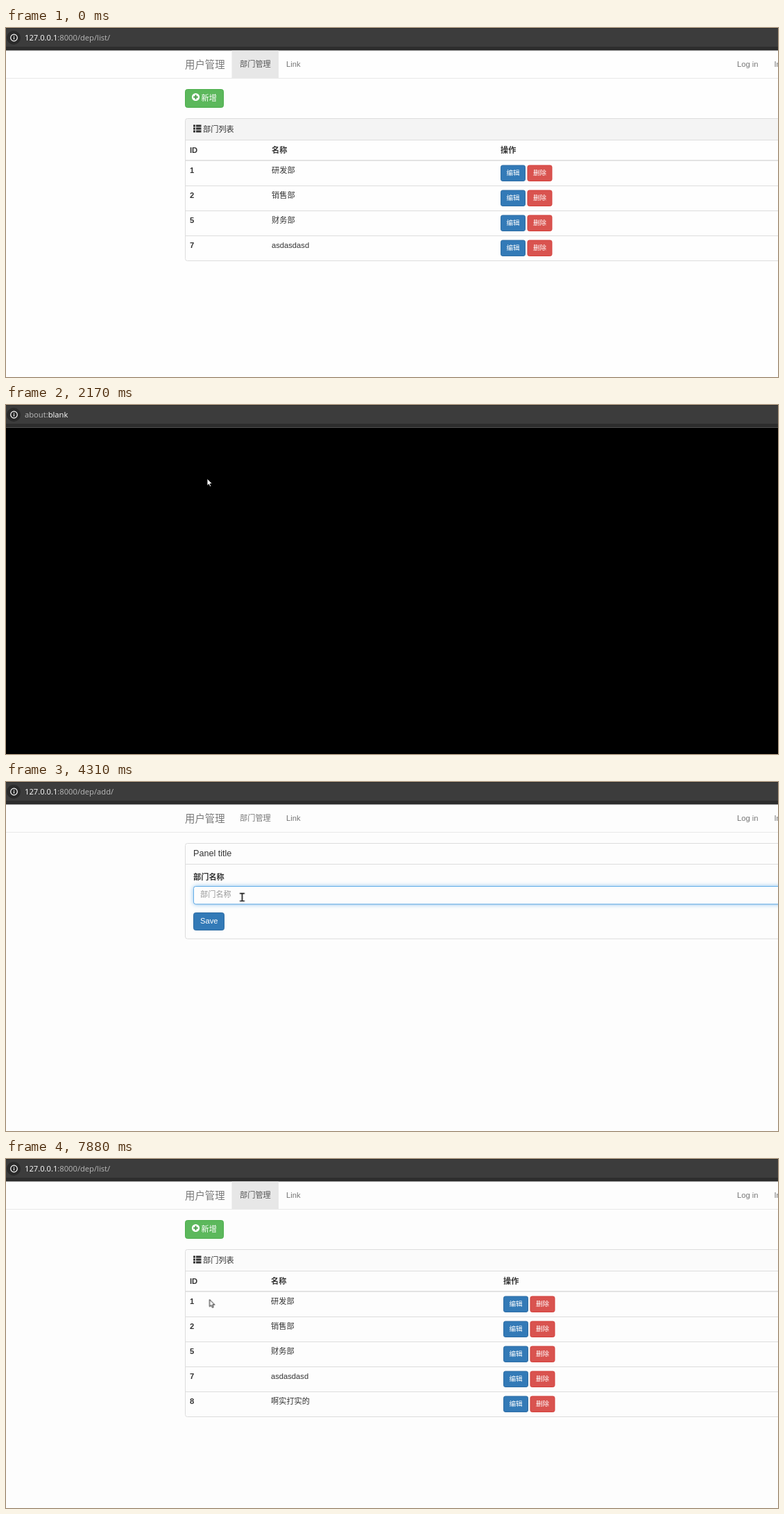
An HTML page for the animation above (8000 ms loop, 1113 by 503 pixels).

```html
<!DOCTYPE html>
<html lang="zh-CN">
<head>
<meta charset="utf-8">
<title>部门管理</title>
<style>
html, body { margin: 0; width: 100%; height: 100%; overflow: hidden; background: #fdfdfd; }
svg { display: block; width: 1113px; height: 503px; }
text { font: 11.2px "Liberation Sans", "Noto Sans CJK SC", "Noto Sans CJK", sans-serif; fill: #333; white-space: pre; }
.url { font: 11.2px "Open Sans", "Noto Sans", sans-serif; fill: #b9b9b9; }
.hi { fill: #fff; }
.nav { fill: #777; }
.on { fill: #555; }
.brand { font-size: 14.4px; fill: #777; }
.b { font-weight: 700; }
.btn { fill: #fff; font-weight: 500; }
.small { fill: #fff; font-size: 9.6px; font-weight: 500; }
.title { font-size: 12.6px; }
.hint { fill: #999; }
.field { fill: #555; }
.cand { fill: #e4e4e4; font-size: 13px; }
#glow { filter: drop-shadow(0 0 3px rgba(102, 175, 233, .75)); }
</style>
</head>
<body>
<svg id="stage" viewBox="0 0 1113 503"></svg>
<script>
const LOOP = 8000;
const pct = ms => ms / LOOP * 100 + '%';
let css = '';

// Visible only within the given [from, to] spans, in ms
function show(id, ...spans) {
  const steps = spans.map(([a, b]) =>
    `${pct(a)}{visibility:visible}${pct(b)}{visibility:hidden}`).join('');
  css += `@keyframes ${id}{0%{visibility:hidden}${steps}}
    #${id}{animation:${id} ${LOOP}ms step-end infinite}`;
}

// Interpolated styles; each stop is [ms, declarations]
function move(id, stops) {
  css += `@keyframes ${id}{${stops.map(([ms, s]) => `${pct(ms)}{${s}}`).join('')}}
    #${id}{animation:${id} ${LOOP}ms linear infinite}`;
}

const box = (x, y, w, h, fill, stroke = 'none', r = 0, extra = '') =>
  `<rect x="${x}" y="${y}" width="${w}" height="${h}" rx="${r}" fill="${fill}" stroke="${stroke}" ${extra}/>`;
const txt = (x, y, s, cls = '') => `<text x="${x}" y="${y}" class="${cls}">${s}</text>`;
const line = (y, color = '#ddd', x = 259) => box(x, y, 1113 - x, 1, color);
const caret = (x, id) => box(x, 156.5, 1, 12, '#333', 'none', 0, `id="${id}"`);

const toolbar = box(0, 0, 1113, 33, '#2d2d2d') + box(-20, 1, 1150, 26, '#3c3c3c') +
  box(0, 32, 1113, 1, '#505050') +
  `<circle cx="11" cy="14" r="10" fill="#2a2a2a"/>
   <circle cx="11.5" cy="14" r="4.8" fill="none" stroke="#fff" stroke-width="1.2"/>
   <path d="M11.5 13.2v3.4M11.5 11.2v1.2" stroke="#fff" stroke-width="1.2"/>`;

const host = path => txt(27, 18, `<tspan class="hi">127.0.0.1</tspan>:8000${path}`, 'url');

const page = (id, bg, path, active, body) => `<g id="${id}">
  ${box(0, 32.5, 1113, 471, bg)}${host(path)}
  ${active ? box(325.5, 32.5, 67.5, 39.5, '#e7e7e7') : ''}${line(72, '#e9e9e9', 0)}
  ${txt(258, 57.5, '用户管理', 'brand')}${txt(337, 56, '部门管理', active ? 'on' : 'nav')}
  ${txt(404, 56, 'Link', 'nav')}${txt(1054, 56, 'Log in', 'nav')}${txt(1107.5, 56, 'In', 'nav')}
  ${body}</g>`;

const addButton = states => box(258.5, 88.5, 55, 26, '#5cb85c', '#4cae4c', 3) + states +
  `<circle cx="273.5" cy="99.5" r="5.6" fill="#fff"/>
   <path d="M270.2 99.5h6.6M273.5 96.2v6.6" stroke="#4a9f4a" stroke-width="2"/>` +
  txt(281.5, 104.5, '新增', 'btn');

const listIcon = [0, 1, 2].map(i =>
  box(270, 139.5 + 4 * i, 3, 3, '#333') + box(274, 139.5 + 4 * i, 7.5, 3, '#333')).join('');

const smallButton = (x, y, s, fill, stroke) =>
  box(x + .5, y + .5, 35, 22.5, fill, stroke, 2.4) + txt(x + 8.5, y + 14.7, s, 'small');

function list(nameX, opX, head, rows, states = '') {
  const body = rows.map(([id, name], i) => {
    const y = 191 + 36 * i;
    return (i ? line(y) : '') + txt(265, y + 18, id, 'b') + txt(nameX, y + 18, name) +
      smallButton(opX, y + 6.5, '编辑', '#337ab7', '#2e6da4') +
      smallButton(opX + 38.5, y + 6.5, '删除', '#d9534f', '#d43f3a');
  }).join('');
  return addButton(states) + box(259, 131, 900, 31, head) + line(161) + listIcon +
    txt(284, 149.5, '部门列表') + txt(265, 180, 'ID', 'b') + txt(nameX, 180, '名称', 'b') +
    txt(opX, 180, '操作', 'b') + box(259, 190, 854, 1.6, '#ddd') + body +
    box(258.5, 130.5, 900, 36 * rows.length + 61, 'none', '#ddd', 3);
}

const rows = [[1, '研发部'], [2, '销售部'], [5, '财务部'], [7, 'asdasdasd']];
const phrase = '啊实打实的';
const letters = 'asdsd';

// Input method: letters so far, caret and candidate bar
function compose(n) {
  const last = n === letters.length, start = 5440 + 85 * (n - 1);
  const width = [6.2, 14.9, 24.3, 33, 42.3][n - 1];
  const words = [...letters.slice(0, n)].map((_, i) => phrase.slice(0, n - i))
    .concat('阿', '呵', '吖', '锕', '嗄', '腌').slice(0, 7);
  let x = 290;
  const cands = words.map((w, i) => {
    const item = txt(x, 199.5, `${i + 1} ${w}`, 'cand');
    x += 13 * w.length + 25;
    return x < 716 ? item : '';
  }).join('');
  show('ime' + n, [start, last ? 6610 : start + 85]);
  show('imeCaret' + n, [start, last ? 6190 : start + 85]);
  return `<g id="ime${n}">${txt(280, 166.5, [...letters.slice(0, n)].join(' '), 'field')}
    <path d="M280 169.5h${width}" stroke="#555" stroke-dasharray="1 1"/>
    ${caret(281 + width, 'imeCaret' + n)}
    ${box(277.5, 178.5, 438, 34, '#2b2b2b', '#454545', 4)}
    ${box(283, 183, 13 * n + 23, 25, '#444', 'none', 3)}${box(283, 189, 2, 13, '#4cc2ff', 'none', 1)}
    ${cands}</g>`;
}

const form = box(258.5, 88.5, 900, 137.5, 'none', '#ddd', 3) + line(118) +
  txt(270, 107.3, 'Panel title', 'title') + txt(270, 141.3, '部门名称', 'b') +
  box(270.5, 150.5, 877, 25.5, '#fdfdfd', '#ccc', 3) +
  box(270.5, 150.5, 877, 25.5, '#fdfdfd', '#66afe9', 3, 'id="glow"') +
  `<g id="hint">${txt(280, 166.3, '部门名称', 'hint')}</g>` +
  `<g id="typed">${txt(280, 167.3, phrase, 'field')}</g>` +
  caret(280.5, 'caretStart') + caret(336, 'caretEnd') +
  box(270.5, 188.5, 44, 25, '#337ab7', '#2e6da4', 3) +
  box(270.5, 188.5, 44, 25, '#286090', '#204d74', 3, 'id="saveHover"') +
  box(270.5, 188.5, 44, 25, '#204d74', '#122b40', 3, 'id="savePress"') +
  txt(280, 204.3, 'Save', 'btn') +
  [1, 2, 3, 4, 5].map(compose).join('');

const pointer = `<g id="pointer" stroke-linejoin="round">
  <path id="arrow" d="M0 0V10.3L2.4 8.2 4 11.7 5.7 11 4.2 7.6H7.4Z" fill="#fff" stroke="#000" stroke-width=".9"/>
  <path id="hand" d="M-1.2 7V0Q-1.2-1.3 0-1.3T1.2 0V4Q2.4 3.3 3.1 4.4 4.3 3.8 4.8 5 6.2 4.8 6.2 6.2V8.4Q6.2 10.2 5 12H-.6Q-1.6 9.8-4 7.6-4.6 5.8-2.9 5.8Z"
    fill="#fff" stroke="#000" stroke-width=".9"/>
  <path id="beam" d="M-3.5-5.3H3.5M-3.5 5.5H3.5M0-5.3V5.5" fill="none" stroke="#222" stroke-width="1.7"/></g>`;

const states = box(258.5, 88.5, 55, 26, '#449d44', '#398439', 3, 'id="addHover"') +
  box(258.5, 88.5, 55, 26, '#398439', '#255625', 3, 'id="addPress"');

document.getElementById('stage').innerHTML = toolbar +
  page('before', '#fefefe', '/dep/list/', true, list(383, 713, '#f4f4f4', rows, states)) +
  `<g id="blank">${box(0, 33, 1113, 471, '#000')}${txt(27, 18, 'about:<tspan class="hi">blank</tspan>', 'url')}</g>` +
  page('add', '#fdfdfd', '/dep/add/', false, form) +
  page('after', '#fdfdfd', '/dep/list/', true, list(382, 717, '#fbfbfb', [...rows, [8, phrase]])) +
  pointer;

show('before', [0, 2170]);
show('blank', [2170, 2310]);
show('add', [2310, 7810]);
show('after', [7810, LOOP]);
show('addHover', [1160, 2030]);
show('addPress', [2030, 2170]);
show('hint', [2310, 5440]);
show('typed', [6610, 7810]);
show('caretStart', [3150, 3510], [3900, 4310], [4730, 5110]);
show('caretEnd', [6610, 6990], [7390, 7590]);
show('saveHover', [7320, 7590], [7720, 7810]);
show('savePress', [7590, 7720]);
show('arrow', [650, 1160], [2170, 2660], [7220, 7320], [7880, LOOP]);
show('hand', [1160, 2170], [7320, 7880]);
show('beam', [2660, 7220]);

const at = (x, y, ease = 'linear') => `transform:translate(${x}px,${y}px);animation-timing-function:${ease}`;
move('pointer', [
  [0, at(702, 480)], [650, at(702, 480, 'cubic-bezier(.25,.5,.4,1)')],
  [1310, at(290, 106)], [2490, at(290, 106, 'ease-in-out')],
  [2770, at(331, 170)], [2910, at(331, 170)], [2950, at(340.5, 166)],
  [7130, at(340.5, 166, 'ease-in-out')], [7420, at(293.5, 202.5)], [LOOP, at(293.5, 202.5)]
]);
move('glow', [
  [0, 'opacity:0'], [3120, 'opacity:0'], [3230, 'opacity:1'],
  [7590, 'opacity:1'], [7720, 'opacity:0'], [LOOP, 'opacity:0']
]);

const style = document.createElement('style');
style.textContent = css;
document.head.append(style);
</script>
</body>
</html>
```
